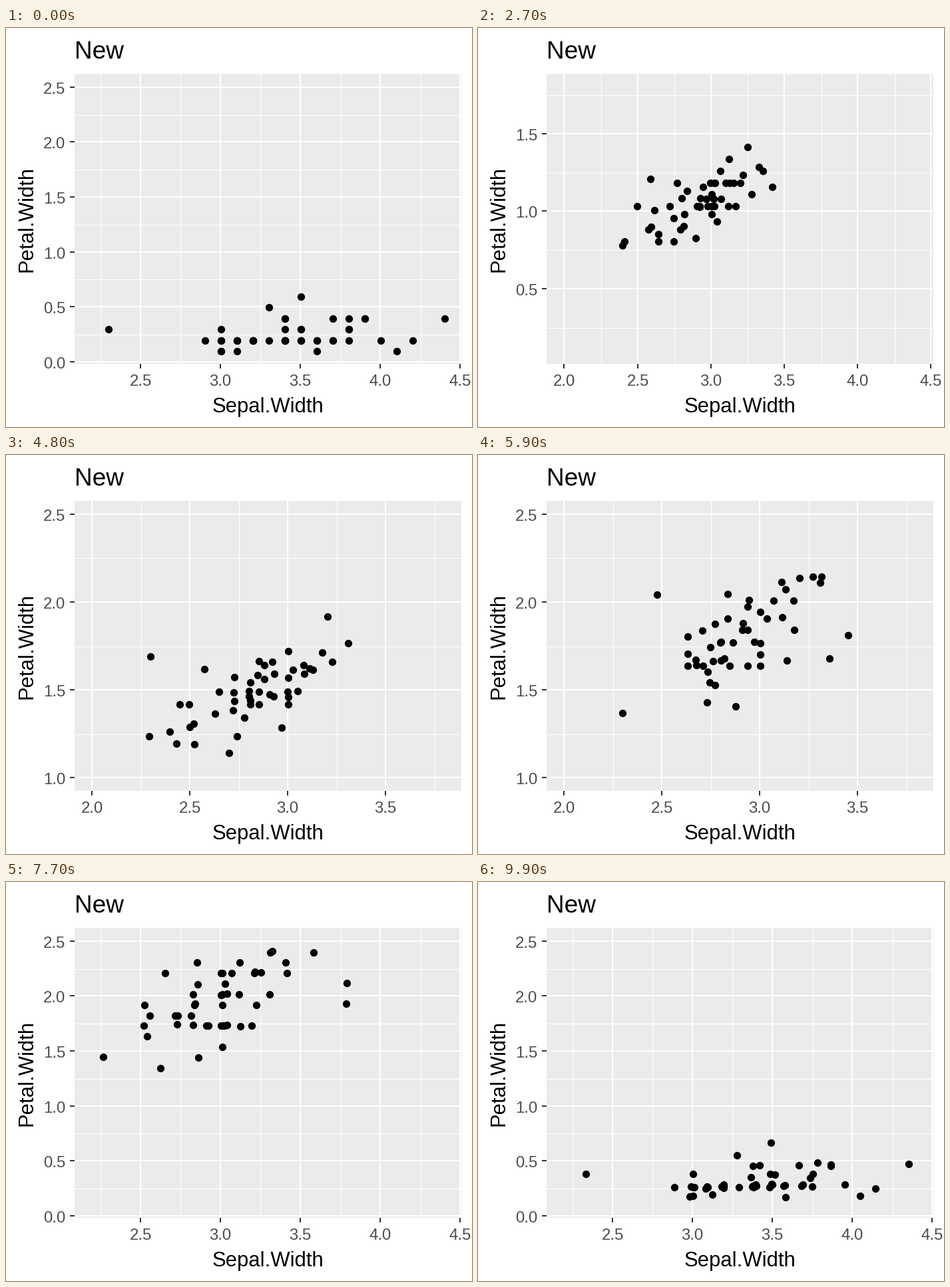
Animation, 700 px wide and 600 px high, one loop 10 s. Source, as a matplotlib script:

```python
import matplotlib.pyplot as plt
import numpy as np
from matplotlib.animation import FuncAnimation
from matplotlib.collections import LineCollection
from matplotlib.patches import Rectangle

plt.rcParams["font.family"] = ["Liberation Sans", "DejaVu Sans"]

W, H, DPI, FRAMES = 700, 600, 100, 100
PX = 72 / DPI                                  # points per pixel
LEFT, RIGHT, TOP, BOTTOM = 103, 684.7, 69, 505
TICK, STEP = 7, 0.5

# Sepal and petal widths of the three groups, in tenths
SEPAL_A = [35, 30, 32, 31, 36, 39, 34, 34, 29, 31, 37, 34, 30, 30, 40, 44, 39,
           35, 38, 38, 34, 37, 36, 33, 34, 30, 34, 35, 34, 32, 31, 34, 41, 42,
           31, 32, 35, 36, 30, 34, 35, 23, 32, 35, 38, 30, 38, 32, 37, 33]
PETAL_A = [2, 2, 2, 2, 2, 4, 3, 2, 2, 1, 2, 2, 1, 1, 2, 4, 4,
           3, 3, 3, 2, 4, 2, 5, 2, 2, 4, 2, 2, 2, 2, 4, 1, 2,
           2, 2, 2, 1, 2, 2, 3, 3, 2, 6, 4, 3, 2, 2, 2, 2]
SEPAL_B = [32, 32, 31, 23, 28, 28, 33, 24, 29, 27, 20, 30, 22, 29, 29, 31, 30,
           27, 22, 25, 32, 28, 25, 28, 29, 30, 28, 30, 29, 26, 24, 24, 27, 27,
           30, 34, 31, 23, 30, 25, 26, 30, 26, 23, 27, 30, 29, 29, 25, 28]
PETAL_B = [14, 15, 15, 13, 15, 13, 16, 10, 13, 14, 10, 15, 10, 14, 13, 14, 15,
           10, 15, 11, 18, 13, 15, 12, 13, 14, 14, 17, 15, 10, 11, 10, 12, 16,
           15, 16, 15, 13, 13, 13, 12, 14, 12, 10, 13, 12, 13, 13, 11, 13]
SEPAL_C = [33, 27, 30, 29, 30, 30, 25, 29, 25, 36, 32, 27, 30, 25, 28, 32, 30,
           38, 26, 22, 32, 28, 28, 27, 33, 32, 28, 30, 28, 30, 28, 38, 28, 28,
           26, 30, 34, 31, 30, 31, 31, 31, 27, 32, 33, 30, 25, 30, 34, 30]
PETAL_C = [25, 19, 21, 18, 22, 21, 17, 18, 18, 25, 20, 19, 21, 20, 24, 23, 18,
           22, 23, 15, 23, 20, 20, 18, 21, 18, 18, 18, 21, 16, 19, 20, 22, 15,
           14, 23, 24, 18, 18, 21, 24, 23, 19, 23, 25, 23, 19, 20, 23, 18]

A, B, C = (np.column_stack(pair) / 10 for pair in
           ((SEPAL_A, PETAL_A), (SEPAL_B, PETAL_B), (SEPAL_C, PETAL_C)))


def window(p, q):
    """Axis limits around two groups with 5 % padding, as rows lo, hi."""
    both = np.vstack((p, q))
    lo, hi = both.min(axis=0), both.max(axis=0)
    pad = 0.05 * (hi - lo)
    return np.array([lo - pad, hi + pad])


GROUPS = [A, B, C, A]
VIEWS = [window(C, A), window(A, B), window(B, C), window(C, A)]
MOVES = [(8, 33), (42, 67), (76, 100)]         # points travel
ZOOMS = [(1, 9), (34, 43), (68, 77)]           # limits change


def linear(t):
    return t


def cubic(t):
    return 4 * t ** 3 if t < 0.5 else 1 - 4 * (1 - t) ** 3


def blend(states, spans, frame, ease):
    value = states[0]
    for (start, end), nxt in zip(spans, states[1:]):
        t = min(max((frame - start) / (end - start), 0), 1)
        value = value + (nxt - value) * ease(t)
    return value


def breaks(lo, hi, offset=0.0):
    first = np.ceil((lo - offset) / STEP - 1e-9)
    last = np.floor((hi - offset) / STEP + 1e-9)
    return np.arange(first, last + 1) * STEP + offset


fig = plt.figure(figsize=(W / DPI, H / DPI), dpi=DPI, facecolor="white")
ax = fig.add_axes([0, 0, 1, 1])
ax.set_xlim(0, W)
ax.set_ylim(H, 0)
ax.axis("off")
ax.add_patch(Rectangle((LEFT, TOP), 684 - LEFT, BOTTOM - TOP, fc="#EBEBEB",
                       lw=0, antialiased=False))


def lines(color, width, z):
    return ax.add_collection(LineCollection(
        [], colors=color, linewidths=width * PX, antialiaseds=False,
        capstyle="butt", zorder=z), autolim=False)


def label(x, y, text, size, color="black", **kw):
    return ax.text(x, y, text, fontsize=size * PX, color=color,
                   va="baseline", **kw)


minor = lines("white", 1, 2)
major = lines("white", 2, 3)
ticks = lines("#333333", 2, 3)
dots = ax.scatter([], [], s=(11.3 * PX) ** 2, c="black", linewidths=0,
                  antialiased=False, zorder=4)

label(LEFT, 46, "New", 37)
label((LEFT + RIGHT) / 2, 578, "Sepal.Width", 31, ha="center")
label(40, (TOP + BOTTOM) / 2, "Petal.Width", 31, ha="right", rotation=90,
      rotation_mode="anchor").set_ha("center")
x_labels = [label(0, 538, "", 24, "#4D4D4D", ha="center") for _ in range(8)]
y_labels = [label(89.5, 0, "", 24, "#4D4D4D", ha="right") for _ in range(8)]


def fill(pool, values):
    for i, text in enumerate(pool):
        text.set_text(f"{values[i]:.1f}" if i < len(values) else "")


def update(frame):
    lo, hi = blend(VIEWS, ZOOMS, frame, cubic)

    def to_x(v):
        return LEFT + (v - lo[0]) / (hi[0] - lo[0]) * (RIGHT - LEFT)

    def to_y(v):
        return BOTTOM - (v - lo[1]) / (hi[1] - lo[1]) * (BOTTOM - TOP)

    def grid(xs, ys, shift):
        return ([[(x + shift, TOP), (x + shift, BOTTOM)] for x in xs]
                + [[(LEFT, y + shift), (684, y + shift)] for y in ys])

    xv, yv = breaks(lo[0], hi[0]), breaks(lo[1], hi[1])
    xs, ys = np.round(to_x(xv)), np.round(to_y(yv))
    xm = np.floor(to_x(breaks(lo[0], hi[0], STEP / 2)))
    ym = np.floor(to_y(breaks(lo[1], hi[1], STEP / 2)))

    minor.set_segments(grid(xm, ym, 0.5))
    major.set_segments(grid(xs, ys, 0))
    ticks.set_segments([[(x, BOTTOM), (x, BOTTOM + TICK)] for x in xs]
                       + [[(LEFT - TICK, y), (LEFT, y)] for y in ys])
    fill(x_labels, xv)
    fill(y_labels, yv)
    for text, x in zip(x_labels, xs):
        text.set_x(x)
    for text, y in zip(y_labels, ys):
        text.set_y(y + 10)

    pts = blend(GROUPS, MOVES, frame, linear)
    dots.set_offsets(np.column_stack((np.round(to_x(pts[:, 0])) + 0.5,
                                      np.round(to_y(pts[:, 1])) + 0.5)))
    return []


anim = FuncAnimation(fig, update, frames=FRAMES, interval=100, repeat=True,
                     init_func=lambda: update(0), blit=False)
plt.show()
```
